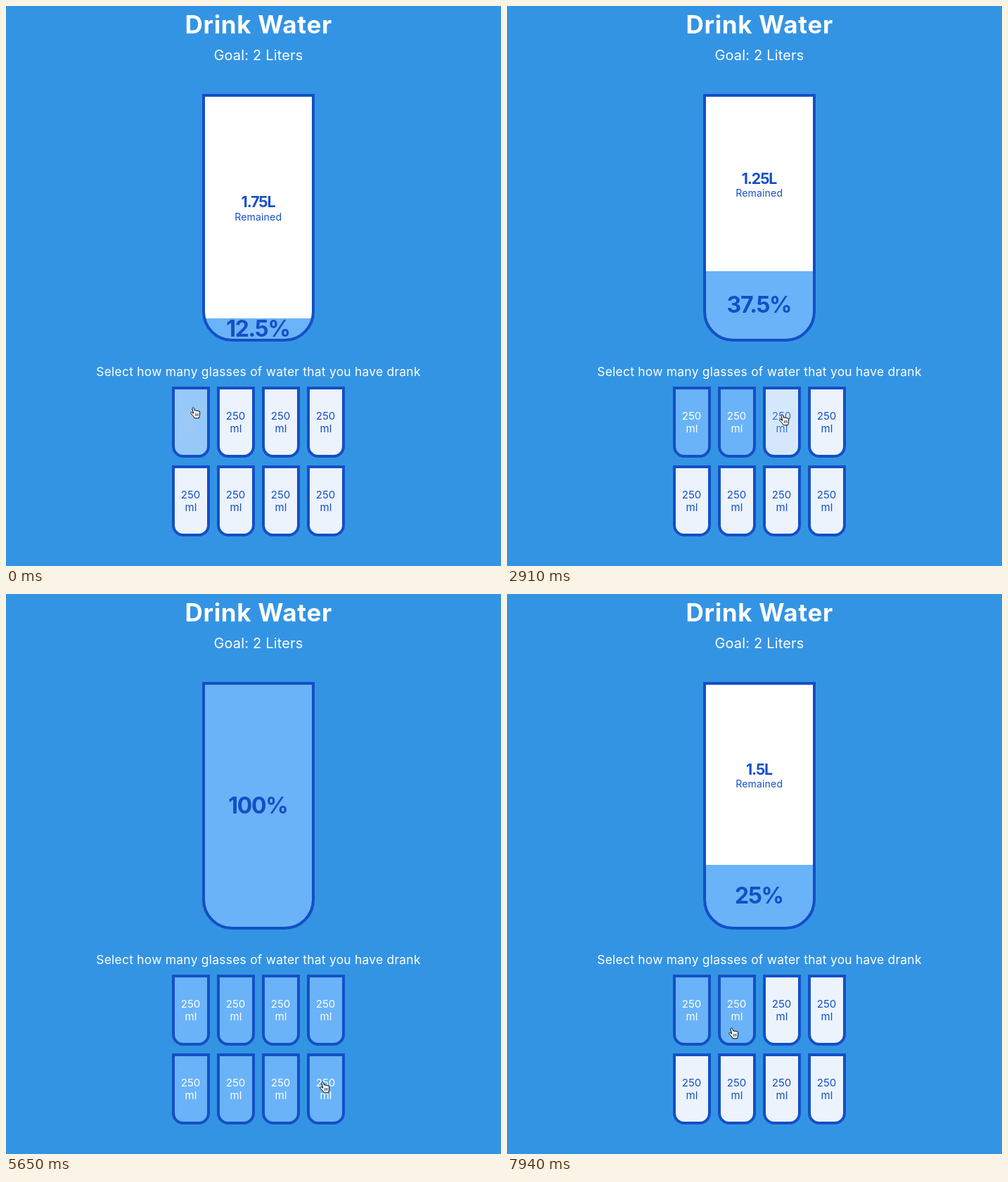
Write an HTML page that moves like this. It is 704 px wide and 796 px high and loops after 8000 ms.

```html
<!DOCTYPE html>
<html lang="en">
<head>
<meta charset="utf-8">
<title>Drink Water</title>
<style>
  html, body { margin: 0; width: 100%; height: 100%; overflow: hidden; background: #3494e4; }
  svg { display: block; width: 704px; height: 796px; font-family: Inter, "Open Sans", sans-serif; }
  text { text-anchor: middle; fill: #144fc6; }
  .light { fill: #fff; }
  .title { font-size: 35px; font-weight: 700; letter-spacing: .02em; }
  .goal { font-size: 19.97px; letter-spacing: .01em; }
  .hint { font-size: 17.4px; letter-spacing: .015em; }
  .liters { font-size: 21.3px; font-weight: 700; letter-spacing: -.05em; }
  .small { font-size: 14.1px; letter-spacing: .01em; }
  .percent { font-size: 32px; font-weight: 700; letter-spacing: -.04em; }
  .glass text { font-size: 15px; }
  .edge { fill: none; stroke: #144fc6; stroke-width: 4; }
</style>
</head>
<body>
<svg viewBox="0 0 704 796">
  <text class="title light" x="359.3" y="38.5">Drink Water</text>
  <text class="goal light" x="359" y="77">Goal: 2 Liters</text>
  <text class="hint light" x="359" y="526">Select how many glasses of water that you have drank</text>
  <clipPath id="inside"><path id="clip"/></clipPath>
  <g clip-path="url(#inside)">
    <rect x="279" y="125" width="160" height="352" fill="#fff"/>
    <g id="remained">
      <text id="liters" class="liters" x="358.5" y="-.5"></text>
      <text class="small" x="358.7" y="18">Remained</text>
    </g>
    <rect id="water" x="279" width="160" height="352" fill="#6ab3f8"/>
    <text id="percent" class="percent" x="358.4"></text>
  </g>
  <path id="cup" class="edge"/>
  <g id="glasses"></g>
  <g id="hand" stroke="#000" stroke-linejoin="round" stroke-linecap="round">
    <path fill="#fff" d="M3 2.3C2.7.5 5 .1 5.5 1.7L6.6 5.3Q8 4.2 8.9 5.5 10.2 4.6 11.2 5.9 13.6 5.2 13.6 7.2V10.5Q13.6 12.4 12.5 15.8H6.2Q5.5 13.5 1 9.4C0 8.3 1.2 7.1 2.5 7.7L4.5 9.1Z"/>
    <path fill="none" stroke-width=".7" d="M7.4 9.4v3.2m1.9 0v-3.2m1.9 0v3.2"/>
  </g>
</svg>
<script>
const LOOP = 8000, FADE = 300, GLIDE = 400;
const TOP = 129, INNER = 344, LABEL = 43.3, PER_GLASS = 44;
const $ = id => document.getElementById(id);

// when a glass is clicked, and how many are full afterwards
const clicks = [[-115, 1], [1730, 2], [2867, 3], [4154, 7], [5260, 8], [6300, 6], [7290, 2]];

// where the pointer comes to rest, and when
const stops = [
  [0, 262, 570], [960, 331, 576], [2030, 341, 573], [2560, 387, 580], [3700, 425, 620],
  [3960, 396, 683], [4850, 446, 693], [6090, 326, 693], [7060, 320, 602], [7940, 315, 616]
];

const lerp = (a, b, k) => a + (b - a) * k;
const mix = (a, b, k) => `rgb(${a.map((v, i) => lerp(v, b[i], k))})`;
const PALE = [236, 243, 252], WATER = [106, 179, 248], INK = [20, 79, 198], WHITE = [255, 255, 255];

// cubic-bezier(.25, .1, .25, 1)
function ease(x) {
  if (x <= 0 || x >= 1) return x <= 0 ? 0 : 1;
  const curve = (s, a, b) => 3 * (1 - s) ** 2 * s * a + 3 * (1 - s) * s * s * b + s ** 3;
  let lo = 0, hi = 1;
  for (let i = 0; i < 24; i++) {
    const mid = (lo + hi) / 2;
    curve(mid, .25, .25) < x ? lo = mid : hi = mid;
  }
  return curve(lo, .1, 1);
}

const tumbler = (x, y, w, h, r) =>
  `M${x} ${y}h${w}v${h - r}a${r} ${r} 0 0 1 ${-r} ${r}h${2 * r - w}a${r} ${r} 0 0 1 ${-r} ${-r}z`;

for (const id of ['cup', 'clip']) $(id).setAttribute('d', tumbler(281, 127, 156, 348, 40.67));

for (let i = 0; i < 8; i++) {
  const x = 238 + i % 4 * 64, y = 543 + (i >> 2) * 112;
  $('glasses').innerHTML += `<g class="glass">
    <path class="edge" d="${tumbler(x, y, 50, 97, 14)}"/>
    <text x="${x + 24.5}" y="${y + 45}">250</text>
    <text x="${x + 25}" y="${y + 63.3}">ml</text></g>`;
}
const glasses = [...document.querySelectorAll('.glass')];

function pointer(t) {
  const i = stops.findIndex(s => s[0] > t);
  if (i < 0) return stops.at(-1).slice(1);
  const [from, x, y] = stops[i - 1], [to, x2, y2] = stops[i];
  const span = Math.min(GLIDE, to - from), k = Math.max(0, 1 - (to - t) / span);
  return [lerp(x, x2, k), lerp(y, y2, k)];
}

function draw(t) {
  const step = clicks.findLastIndex(c => c[0] <= t);
  const [start, full] = clicks[step], before = step ? clicks[step - 1][1] : 0;
  const k = ease((t - start) / FADE);

  // at seven glasses the label above keeps its own height
  const room = full === 7 ? INNER - LABEL : INNER;
  const level = Math.round(Math.min(lerp(before, full, k) * PER_GLASS, room));
  const surface = TOP + INNER - level;
  $('water').setAttribute('y', surface);
  $('percent').setAttribute('y', surface + level / 2 + 11);
  $('percent').textContent = full * 12.5 + '%';
  $('liters').textContent = 2 - full / 4 + 'L';
  $('remained').setAttribute('transform', `translate(0 ${(TOP + surface) / 2})`);
  $('remained').setAttribute('visibility', full === 8 ? 'hidden' : 'visible');

  glasses.forEach((glass, i) => {
    const f = lerp(i < before, i < full, k);
    const [body, ...labels] = glass.children;
    body.style.fill = mix(PALE, WATER, f);
    labels.forEach(label => label.style.fill = mix(INK, WHITE, f));
  });
  $('hand').setAttribute('transform', `translate(${pointer(t)})`);
}

const origin = performance.now();
function tick() {
  draw((performance.now() - origin) % LOOP);
  requestAnimationFrame(tick);
}
tick();
</script>
</body>
</html>
```
